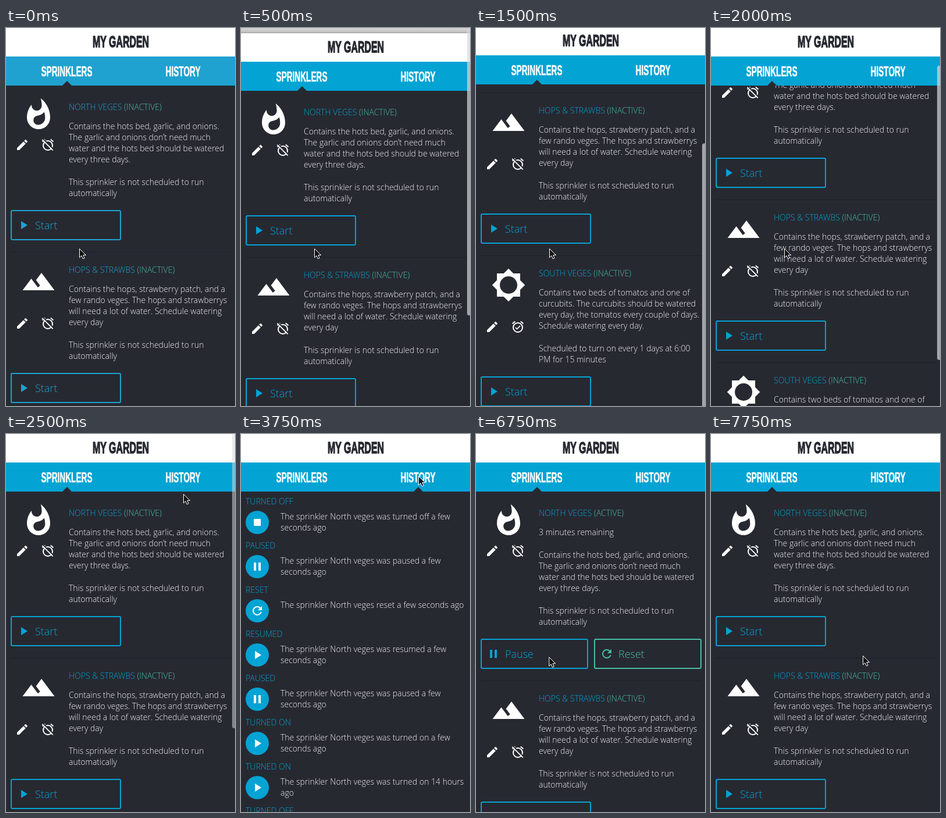
Write an HTML page that moves like this. It is 394 by 650 pixels and loops after 8000 ms.

```html
<!DOCTYPE html>
<html lang="en">
<head>
<meta charset="utf-8">
<title>My Garden</title>
<style>
  html, body { margin: 0; width: 100%; height: 100%; overflow: hidden; background: #272931; }
  svg { display: block; --blue: #03a3d4; --teal: #48bfa4; --dark: #272931; }
  text { font: 300 14px "Open Sans", "Noto Sans", sans-serif; fill: #f4f4f4; white-space: pre; }
  .blue { fill: var(--blue); }
  .teal { fill: var(--teal); }
  .dark { fill: var(--dark); }
  .white { fill: #fff; }
  .label { font-size: 18px; }
  .head { font: 700 24px "Liberation Sans", Arial, sans-serif; text-anchor: middle; fill: #fff; stroke: #fff; stroke-width: .6; }
  .title { font-size: 28px; fill: var(--dark); stroke: var(--dark); stroke-width: 1.4; }
  .line { fill: none; stroke: #fff; stroke-width: 2; }
</style>
</head>
<body>
<svg id="stage" width="394" height="650" viewBox="0 0 394 650"></svg>
<script>
const LOOP = 8000, STEP = 250, MAX_SCROLL = 272, THUMB = 506;

const solid = d => `<path fill-rule="evenodd" d="${d}"/>`;
const clock = '<g class="line"><circle cx="12" cy="13" r="8"/>';
const ICONS = {
  flame: solid('M13.5.67s.74 2.65.74 4.8c0 2.06-1.35 3.73-3.41 3.73-2.07 0-3.63-1.67-3.63-3.73l.03-.36C5.21 7.51 4 10.62 4 14a8 8 0 0 0 16 0C20 8.61 17.41 3.8 13.5.67zM11.71 19c-1.78 0-3.22-1.4-3.22-3.14 0-1.62 1.05-2.76 2.81-3.12 1.77-.36 3.6-1.21 4.62-2.58.39 1.29.59 2.65.59 4.04 0 2.65-2.15 4.8-4.8 4.8z'),
  hills: solid('M14 6l-3.75 5 2.85 3.8-1.6 1.2L7 10l-6 8h22z'),
  sun: solid('M20 15.31L23.31 12 20 8.69V4h-4.69L12 .69 8.69 4H4v4.69L.69 12 4 15.31V20h4.69L12 23.31 15.31 20H20zM18 12a6 6 0 1 1-12 0 6 6 0 0 1 12 0z'),
  pencil: solid('M3 17.25V21h3.75L17.81 9.94l-3.75-3.75zM20.71 7.04a1 1 0 0 0 0-1.41l-2.34-2.34a1 1 0 0 0-1.41 0l-1.83 1.83 3.75 3.75z'),
  alarmOff: clock + '<path d="M7.3 2.6 2.6 6.5M16.8 2.6l4.6 3.9"/><path stroke="#272931" d="M3.6 1.6 22 20"/><path stroke-width="1.8" d="M2.3 2.9 20.7 21.4"/></g>',
  alarmOn: clock + '<path d="M7.3 2.6 2.6 6.5M16.8 2.6l4.6 3.9"/><path stroke-width="1.5" d="M7.9 12.9l2.6 2.7 5.5-5.5"/></g>',
  play: solid('M8 5v14l11-7z'),
  pause: solid('M6 5h4v14H6zM14 5h4v14h-4z'),
  stop: solid('M6 6h12v12H6z'),
  reset: solid('M17.65 6.35A8 8 0 1 0 19.73 14h-2.08A6 6 0 1 1 16.22 7.78L13 11h7V4z')
};

const icon = (name, x, y, size = 24, cls = 'white') =>
  `<g class="${cls}" transform="translate(${x} ${y}) scale(${size / 24})">${ICONS[name]}</g>`;
const text = (x, y, str, cls = '') => `<text x="${x}" y="${y}" class="${cls}">${str}</text>`;
const lines = (x, y, list) => list.map((s, i) => text(x, y + 19 * i, s)).join('');
// Condensed capitals
const heading = (x, y, str, cls = '') =>
  `<g transform="translate(${x} ${y}) scale(.57 1)"><text class="head ${cls}">${str}</text></g>`;

function button(x, y, w, name, label, color) {
  return `<rect x="${x + 1}" y="${y + 1}" width="${w - 2}" height="50" rx="2" fill="none" stroke="var(--${color})" stroke-width="2"/>`
    + icon(name, x + 10, y + 14, 24, color) + text(x + 42, y + 33, label, 'label ' + color);
}

const UNSCHEDULED = ['This sprinkler is not scheduled to run', 'automatically'];
const CARDS = [
  { name: 'NORTH VEGES', icon: 'flame', iconY: -17, toolY: 53, alarm: 'alarmOff', plan: UNSCHEDULED,
    body: ['Contains the hots bed, garlic, and onions.', 'The garlic and onions don’t need much',
      'water and the hots bed should be watered', 'every three days.'] },
  { name: 'HOPS &amp; STRAWBS', icon: 'hills', iconY: -10, toolY: 80, alarm: 'alarmOff', plan: UNSCHEDULED,
    body: ['Contains the hops, strawberry patch, and a', 'few rando veges. The hops and strawberrys',
      'will need a lot of water. Schedule watering', 'every day'] },
  { name: 'SOUTH VEGES', icon: 'sun', iconY: -10, toolY: 80, alarm: 'alarmOn',
    plan: ['Scheduled to turn on every 1 days at 6:00', 'PM for 15 minutes'],
    body: ['Contains two beds of tomatos and one of', 'curcubits. The curcubits should be watered',
      'every day, the tomatos every couple of days.', 'Schedule watering every day.'] }
];

function card(c, y, active) {
  const dy = active ? 39 : 0;
  const state = active ? '(ACTIVE)' : '(INACTIVE)';
  return `<g transform="translate(0 ${y})">`
    + text(108, 5, `${c.name} <tspan class="teal">${state}</tspan>`, 'blue')
    + icon(c.icon, 26, c.iconY, 60) + icon('pencil', 16, c.toolY) + icon(c.alarm, 60, c.toolY)
    + (active ? text(108, 38, '<tspan id="left">4</tspan> minutes remaining') : '')
    + lines(108, 38 + dy, c.body) + lines(108, 134 + dy, c.plan)
    + (active
      ? button(8, 177 + dy, 185, 'pause', 'Pause', 'blue') + button(203, 177 + dy, 185, 'reset', 'Reset', 'teal')
      : button(8, 177, 190, 'play', 'Start', 'blue'))
    + `<rect x="8" y="${249 + dy}" width="380" height="1" fill="#1e2026"/></g>`;
}

const list = active => CARDS.map((c, i) => card(c, 136 + 280 * i + (active && i ? 39 : 0), active && !i)).join('');

const EVENTS = [
  ['TURNED OFF', 'stop', 'was turned off a few', 'seconds ago'],
  ['PAUSED', 'pause', 'was paused a few', 'seconds ago'],
  ['RESET', 'reset', 'reset a few seconds ago'],
  ['RESUMED', 'play', 'was resumed a few', 'seconds ago'],
  ['PAUSED', 'pause', 'was paused a few', 'seconds ago'],
  ['TURNED ON', 'play', 'was turned on a few', 'seconds ago'],
  ['TURNED ON', 'play', 'was turned on 14 hours', 'ago'],
  ['TURNED OFF', 'stop', 'was turned off 14 hours', 'ago']
];
const history = EVENTS.map(([name, sign, first, ...rest], i) =>
  `<g transform="translate(0 ${116 + 76 * i})">` + text(8, 5, name, 'blue')
  + '<circle class="blue" cx="28" cy="36" r="20"/>' + icon(sign, 16, 24)
  + lines(68, 31, ['The sprinkler North veges ' + first, ...rest]) + '</g>').join('');

const stage = document.getElementById('stage');
stage.innerHTML = `
  <defs><linearGradient id="edge" x2="0" y2="1">
    <stop offset="0" stop-color="#d2d2d2"/><stop offset=".6" stop-color="#cacaca"/><stop offset="1" stop-color="#a4a4a4"/>
  </linearGradient></defs>
  <rect width="394" height="9" fill="url(#edge)"/>
  <g id="page">
    <rect class="dark" width="394" height="720"/>
    <g id="idle">${list(false)}</g>
    <g id="active">${list(true)}</g>
    <g id="history">${history}</g>
    <rect class="white" width="394" height="49"/>
    <rect class="blue" y="49" width="394" height="50"/>
    ${heading(197.5, 33.4, 'MY GARDEN', 'title')}
    ${heading(104.5, 82.7, 'SPRINKLERS')}
    ${heading(304.5, 82.7, 'HISTORY')}
    <path id="notch" class="dark" d="M-8 99 0 91l8 8z"/>
  </g>
  <rect id="thumb" x="389" width="9" rx="3.5" fill="#d8d9db"/>
  <path id="cursor" fill="#111" stroke="#fff" d="M.5.5v15.3l3.5-3.3 2.4 5.4 2.7-1.2-2.3-5.2h4.7z"/>`;

const el = id => document.getElementById(id);
const [page, idle, active, past, notch, thumb, cursor, left] =
  ['page', 'idle', 'active', 'history', 'notch', 'thumb', 'cursor', 'left'].map(el);

// Each key is [time, value, ...]; values in between are linear.
function track(keys, t) {
  const i = keys.findIndex(k => k[0] > t);
  if (i < 0) return keys[keys.length - 1].slice(1);
  if (!i) return keys[0].slice(1);
  const a = keys[i - 1], b = keys[i], f = (t - a[0]) / (b[0] - a[0]);
  return a.slice(1).map((v, j) => v + (b[j + 1] - v) * f);
}

const SCROLL = [[0, 0], [500, -9], [750, 40], [1000, 190], [1250, 280], [1500, 274], [1750, 230], [2000, 90], [2250, 0]];
const POINTER = [[0, 126, 379], [2000, 126, 379], [2500, 305, 103], [3250, 305, 72], [3750, 305, 72],
  [4500, 100, 76], [4750, 96, 89], [5250, 68, 352], [5750, 68, 352], [6250, 80, 384], [6500, 80, 384],
  [7500, 261, 381]];
const BAR = [[0, 0], [250, .7], [2250, .7], [3250, 0]];

const show = (node, on) => node.setAttribute('display', on ? 'inline' : 'none');
const move = (node, x, y) => node.setAttribute('transform', `translate(${x} ${y})`);

function draw(time) {
  const t = Math.floor(time % LOOP / STEP) * STEP;
  const [scroll] = track(SCROLL, t);
  const inner = Math.max(0, Math.min(MAX_SCROLL, scroll));
  const over = scroll - inner;
  const inHistory = t >= 3750 && t < 4750;
  const running = t >= 5500 && t < 7750;

  stage.style.setProperty('--blue', t < 250 ? '#1fa2d0' : '#03a3d4');
  move(page, 0, -over);
  move(idle, 0, -inner);
  show(idle, !inHistory && !running);
  show(active, running);
  show(past, inHistory);
  move(notch, inHistory ? 305 : 105, 0);
  left.textContent = t < 6250 ? 4 : 3;

  const squeeze = Math.abs(over) * 1.3;
  thumb.setAttribute('y', inner * 196 / MAX_SCROLL + (over > 0 ? squeeze : 0));
  thumb.setAttribute('height', THUMB - squeeze);
  thumb.setAttribute('opacity', track(BAR, t)[0]);
  move(cursor, ...track(POINTER, t));
}

const start = performance.now();
function tick() {
  draw(performance.now() - start);
  requestAnimationFrame(tick);
}
tick();
</script>
</body>
</html>
```
